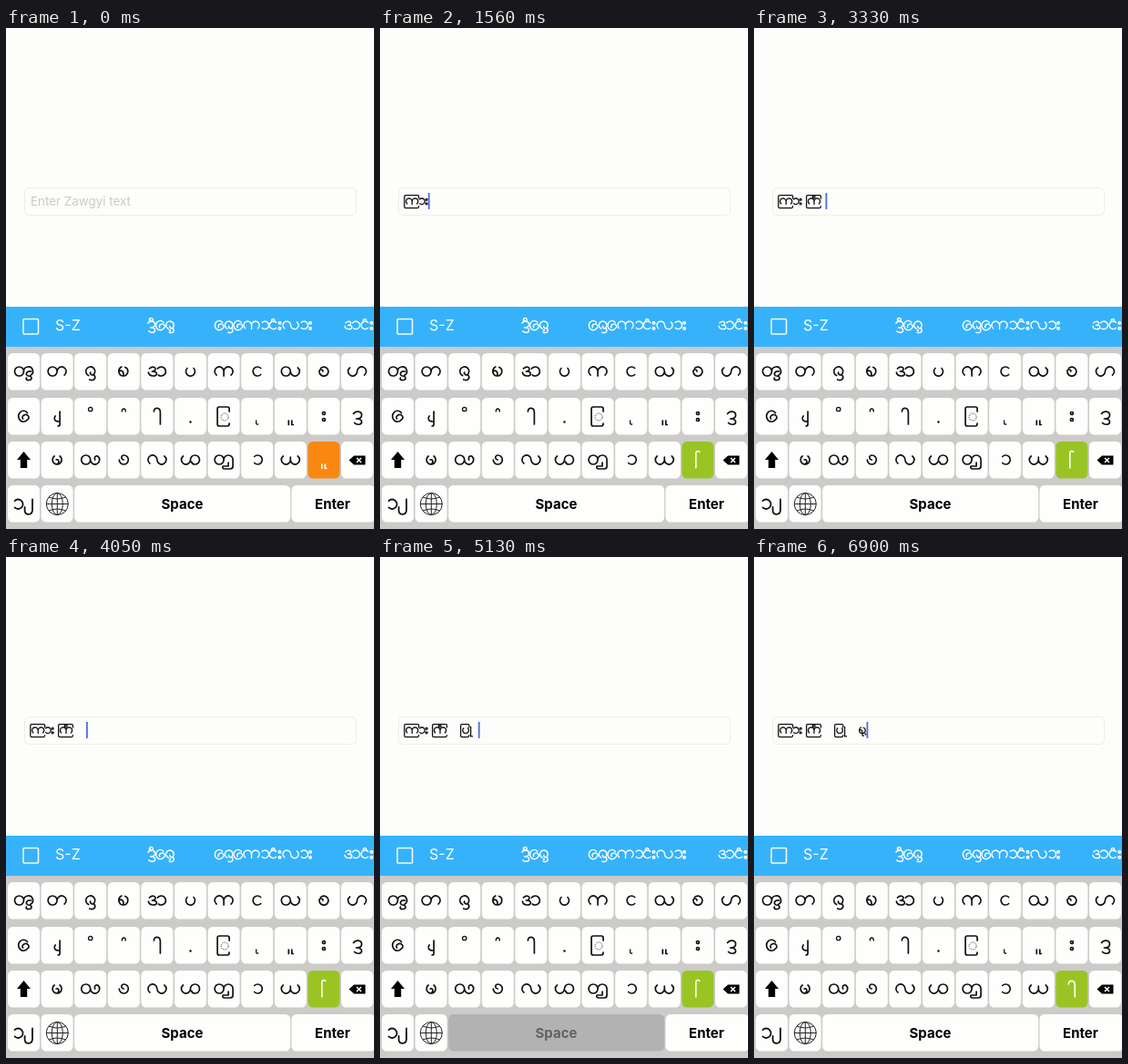
An HTML page that plays this animation: 404x550 px, repeating every 6930 ms.

```html
<!DOCTYPE html>
<html lang="en">
<head>
<meta charset="utf-8">
<title>Keyboard demo</title>
<style>
html, body { margin: 0; width: 100%; height: 100%; overflow: hidden; background: #fdfdfc; }
svg { display: block; width: 100%; height: 100%; }
text { font-family: Inter, Roboto, sans-serif; }
.glyph { fill: none; stroke: #111; stroke-linecap: round; stroke-linejoin: round; }
.light .glyph { stroke: #fff; }
.label { font-weight: 700; font-size: 15px; text-anchor: middle; }
.key rect { fill: #fefefd; }
.key.down rect { fill: #b3b2b2; }
.key.down .glyph, .key.down text { opacity: .45; }
.key.hint rect { fill: #99c424; }
.key.hint.first rect { fill: #f8880f; }
.hint .glyph { stroke: #fff; }
</style>
</head>
<body>
<svg id="stage" viewBox="0 0 404 550" preserveAspectRatio="none">
  <rect width="404" height="550" fill="#fdfdfc"/>
  <rect x="20.5" y="175.5" width="364" height="30" rx="5" fill="#fdfdfc" stroke="#eeede4"/>
  <text id="prompt" x="27" y="195" font-size="13.4" fill="#cbcac2">Enter Zawgyi text</text>
  <g id="typed"></g>
  <rect id="caret" y="181" width="1.8" height="18" fill="#4a6fd8"/>
  <rect y="306" width="404" height="44" fill="#36b2fb"/>
  <rect y="350" width="404" height="200" fill="#cccbc9"/>
  <g id="bar" class="light">
    <rect x="19" y="319.500" width="16.500" height="16.500" rx="1" fill="none" stroke="#f4fbf4" stroke-width="1.500"/>
    <text x="54" y="332" font-size="16" fill="#fff">S-Z</text>
  </g>
  <g id="keys"></g>
</svg>
<script>
const LOOP = 6930;
const ring = (x, y, r) => `M${x + r} ${y}a${r} ${r} 0 1 0 ${-2 * r} 0a${r} ${r} 0 1 0 ${2 * r} 0`;
const O = ring(5, 5, 5);
const U = 'M2 1A5 5 0 1 0 10 5';       // left bowl, open above
const N = 'M2 9A5 5 0 1 1 10 5';       // left bowl, open below
const U2 = 'M10 5A5 5 0 1 0 18 1';     // right bowl, open above
const N2 = 'M10 5A5 5 0 1 1 18 9';     // right bowl, open below
const dot = y => ring(1, y, .6);
const frame = w => `M${w} 0V-3Q${w}-5 ${w - 2}-5H2Q0-5 0-3V14Q0 16 2 16H${w - 2}Q${w} 16 ${w} 13`;

// name: [width, path]; letters stand between y = 0 and y = 10
const G = {
  hsa: [20, O + 'M10 5A5 5 0 1 1 17 9.500M18 5C13 4 11 9 15 10C19 10 20 14 16 14.500C13 15 12 13 13 12'],
  ta: [20, O + N2],
  na: [10, 'M3 9.500A5 5 0 1 1 8.500 8.500C6 10 4 7 5 6M8.500 8.500C12 12 9 16 4 14'],
  ma: [11, 'M3 0C1 1 0 3 0 5A5 5 0 0 0 10 5A4.500 4.500 0 0 0 7 .5M0 5C3 3 6 5 5 10'],
  a: [19, 'M1 2C4-1 8 0 7.500 3C7 5 4 5 4 5C11 5 10 10 5 10C2 10 0 8 0 6M10 2A5 5 0 1 1 11 9'],
  pa: [10, 'M1.500 1.500A5 5 0 1 0 8.500 1.500'],
  ka: [20, N + 'V10' + N2],
  nga: [9, 'M8.500 1.500A5 5 0 1 0 8.500 8.500'],
  sa: [20, O + U2],
  ca: [10, 'M1.500 1.500A5 5 0 1 1 0 5A2 2 0 0 1 4 5'],
  ha: [20, U + 'A5 5 0 1 1 18 9'],
  e: [10, 'M9 1.500A5.500 6 0 1 0 9 9A3.500 3 0 1 0 4 8'],
  ya: [6, 'M1 5C-1 8 0 11 5 11M6 0V14Q6 16 4 16'],
  i: [5, ring(2.5, -2.5, 2.2)],
  asat: [4, 'M0 0C0-4 4-4 4 0'],
  tall: [7, 'M0 0C0-5 7-5 7 1V14'],
  dot: [2, dot(11.5)],
  ra: [14, frame(13)],
  raDots: [14, frame(13)],
  u: [2, 'M0 10V13Q0 14.500 2 14'],
  uu: [4, 'M0 10V14.500M3.500 10V14.500H5'],
  vis: [4, ring(2, 2, 1.5) + ring(2, 9, 1.5)],
  da: [10, 'M1 2.500C3-1 10-1 10 4C10 7 7 8 4 8C8 8 10 9 10 11.500C10 15 4 15 2 12.500'],
  pha: [10, 'M2 1A5 5 0 1 0 8 1M5 10C8 8 7 4 4 5'],
  hta: [20, O + U2 + 'C15 0 14 3 15 5'],
  kha: [10, 'M0 5A5 5 0 1 0 5 0A2.500 2.500 0 0 0 5 5'],
  la: [20, N + 'A5 5 0 1 0 18 1'],
  ba: [20, U + 'A5 5 0 1 1 15 10A4 4 0 0 1 11 7'],
  nya: [20, O + 'M10 5A5 5 0 1 1 20 5V12Q20 15 17 15H11Q8 15 9 12H15V8'],
  aa: [9, 'M1.500 1.500A5 5 0 1 1 1.500 8.500'],
  ya2: [20, U + 'V2' + U2],
  two: [9, 'M9 0V11C9 17 1 17 1 12V8'],
  long: [4, 'M0 14V-2C0-5 3-5 4-3.500'],
  yw: [8, 'M0 9V14H3V9M8 6V14H5'],
  yh: [8, 'M0 9V13H3M8 4V15H4V11'],
  nn: [10, 'M1.500 6A4.500 4.500 0 1 1 8 7C5 8 1 10 4 11.500S8 8 10 9'],
  wy: [7, ring(2, 12, 2) + 'M7 5V15H4'],
  wh: [8, ring(5, 12, 2.2) + 'M0 9V13H3'],
  dotMid: [2, dot(10)],
  none: [0, ''],
  uuh: [5, 'M0 8V14M4 8V14H6'],
  ou: [11, 'M1.500 1.500A5 5 0 1 1 7 10C1 10 2 15 7 14L10 12'],
  nna: [22, N + 'V10' + N2 + 'M18 9C22 9 22 4 20 3'],
  ee: [10, 'M8 3A4 4 0 1 0 5 9C9 9 10 4 6 5M5 9C1 12 6 15 9 12'],
  ba2: [10, 'M2 1A5 5 0 1 0 8 1C5-1 4 4 8 4'],
  sub: [2, 'M2 10V14Q2 15 0 15'],
  ii: [5, ring(2.5, -2, 2.2) + dot(-2)],
  kinzi: [3, 'M2 0V-4Q0-5 0-3M3-6V-5'],
  w: [5, ring(2.5, 11.5, 2.2)],
  dotTop: [2, dot(-2)],
  slash: [5, 'M0-3L5 0'],
  uTall: [3, 'M0-1V15H3'],
  uuTall: [5, 'M0-1V15M4-1V15H5'],
  tallAsat: [9, 'M0 0C0-5 7-5 7 1V11M5-6Q9-7 9-4'],
  dha: [10, 'M1 8A5 5 0 1 1 5 10C1 10 1 6 5 6'],
  za: [10, 'M1 3A5 4 0 1 1 7 6C2 7 3 3 6 4M7 6C10 10 2 12 1 8'],
  tta: [10, 'M1 3A5 4 0 1 1 9 6H4C0 8 5 9 9 9V13Q8 15 4 14'],
  gha: [18, 'M2 1A5 5 0 1 0 9 7V2M9 7A4.500 4.500 0 1 0 15 1Q12 2 13 5'],
  lla: [10, 'M1 4A5 4 0 1 1 6 6C2 6 1 10 6 10C11 10 10 15 5 14'],
  bar: [1, 'M.5 2V9'],
  bars: [4, 'M.5 2V9M3.500 2V9'],
  wa: [10, O]
};
const MARKS = ['i', 'ii', 'dot', 'asat', 'u'];
const NS = 'http://www.w3.org/2000/svg';
const $ = id => document.getElementById(id);

function add(parent, tag, attrs, content) {
  const el = document.createElementNS(NS, tag);
  for (const k in attrs) el.setAttribute(k, attrs[k]);
  if (content) el.textContent = content;
  return parent.appendChild(el);
}

function glyph(parent, name, x, y, s = 1, line = 1.7) {
  const g = add(parent, 'g', { class: 'glyph', transform: `translate(${x} ${y}) scale(${s})`, 'stroke-width': line / s });
  add(g, 'path', { d: G[name][1] });
  if (name === 'raDots') add(g, 'path', { d: ring(8, 6, 4), 'stroke-width': 1, 'stroke-dasharray': '.1 2' });
  return g;
}

function run(parent, names, x, y, s, line) {
  let last = 0;
  for (const name of names.split(' ')) {
    const w = G[name][0] * s;
    if (MARKS.includes(name)) {
      glyph(parent, name, x - 2 * s - last / 2 - w / 2, y, s, line);
    } else {
      glyph(parent, name, x, y, s, line);
      x += w + 2 * s;
      last = w;
    }
  }
}

run($('bar'), 'da ii e na dot', 155, 322, .86, 1.4);
run($('bar'), 'e na e ka aa nga asat vis la aa vis', 230, 322, .86, 1.4);
run($('bar'), 'a nga asat vis', 372, 322, .86, 1.4);

// Keyboard
const PITCH = 36.6, ROWS = [357, 406, 454, 502];
const keys = {};

function key(parent, name, x, y, w = 35) {
  const g = add(parent, 'g', { class: 'key' });
  add(g, 'rect', { x, y, width: w, height: 40.5, rx: 5.5 });
  return keys[name] = g;
}

function layer(rows) {
  const g = add($('keys'), 'g', {});
  rows.forEach((row, r) => row.split(' ').forEach((name, i) => {
    const x = 2 + PITCH * (i + (r === 2 ? 1 : 0));
    const k = key(g, name, x, ROWS[r]);
    if (name === 'at') {
      add(k, 'text', { x: x + 17.5, y: ROWS[r] + 25, 'font-size': 17, 'text-anchor': 'middle' }, '@');
    } else {
      glyph(k, name, x + 17.5 - G[name][0] / 2, ROWS[r] + 15, 1, MARKS.includes(name) ? 1.3 : 1.7);
    }
  }));
  return g;
}

const plain = layer([
  'hsa ta na ma a pa ka nga sa ca ha',
  'e ya i asat tall dot raDots u uu vis da',
  'pha hta kha la ba nya aa ya2'
]);
const shifted = layer([
  'yw yh nn wy wh dotMid none uuh ou nna ee',
  'ba2 sub ii kinzi w dotTop slash uTall uuTall tallAsat dha',
  'za tta gha lla at bar bars wa'
]);

const fixed = add($('keys'), 'g', {});
const shift = key(fixed, 'shift', 2, ROWS[2]);
add(shift, 'path', { d: 'M19.500 465L27 474H23.200V483H15.800V474H12Z' });

const hint = key(fixed, 'hint', 2 + PITCH * 9, ROWS[2]);
const hints = {};
for (const name of ['uu', 'long', 'aa', 'dot', 'tall']) {
  const s = name === 'aa' ? .85 : 1;
  hints[name] = glyph(hint, name, 348.8 - G[name][0] * s / 2, ROWS[2] + 15, s, name === 'dot' ? 2 : 1.6);
}

const back = key(fixed, 'back', 2 + PITCH * 10, ROWS[2]);
add(back, 'path', { d: 'M376.500 474.500L382 469.500H394.500V479.500H382Z' });
add(back, 'path', { d: 'M385 472l5 5m0-5l-5 5', stroke: '#fff', 'stroke-width': 1.5 });

run(key(fixed, 'digits', 2, ROWS[3]), 'aa two', 8, 517.5, 1.05, 1.8);

const globe = add(key(fixed, 'globe', 2 + PITCH, ROWS[3]), 'g', { fill: 'none', stroke: '#222' });
add(globe, 'circle', { cx: 56.3, cy: 522.5, r: 12 });
add(globe, 'ellipse', { cx: 56.3, cy: 522.5, rx: 6, ry: 12 });
add(globe, 'path', { d: 'M44.300 522.500h24M56.300 510.500v24M47 515q9.300 4 18.600 0M47 530q9.300-4 18.600 0' });

add(key(fixed, 'space', 75.2, ROWS[3], 237), 'text', { x: 193.5, y: 528, class: 'label' }, 'Space');
add(key(fixed, 'enter', 313.5, ROWS[3], 92), 'text', { x: 358.5, y: 528, class: 'label' }, 'Enter');

// Presses: time, key, caret x, hint, then the typed glyph with its x
const presses = [
  [600, 'raDots', 42, 'long', 'ra', 26.8],
  [900, 'ka', 43.5, 'aa', 'ka', 28.6],
  [1140, 'aa', 49, 'long', 'aa', 42.6],
  [1380, 'vis', 52.8, 'long', 'vis', 49.8],
  [1740, 'space', 57, 'long'],
  [2040, 'raDots', 71, 'long', 'ra', 57.6],
  [2280, 'ka', 73.5, 'aa', 'ka', 59.4],
  [2520, 'shift', 73.5, 'aa'],
  [2820, 'ii', 74, 'long', 'ii', 64],
  [3180, 'space', 78.5, 'long'],
  [3480, 'space', 83.5, 'long'],
  [3780, 'space', 88, 'long'],
  [4170, 'raDots', 100, 'long', 'ra', 88.6],
  [4380, 'pa', 101, 'long', 'pa', 90.8],
  [4620, 'u', 101.5, 'long', 'uTall', 99.6],
  [4830, 'space', 104.5, 'long'],
  [5070, 'space', 107.8, 'long'],
  [5340, 'space', 111.5, 'long'],
  [5580, 'space', 115, 'long'],
  [5820, 'ma', 123.5, 'dot', 'ma', 115.6],
  [6300, 'u', 123.5, 'dot', 'u', 119],
  [6630, 'dot', 123.5, 'tall', 'dot', 121.8]
];
const typed = presses.map(([, , , , name, x], i) => {
  if (!name) return null;
  const g = glyph($('typed'), name, x, 187, .66, 1.3);
  // The frame is as wide as the letter that follows it
  if (name === 'ra') g.firstChild.setAttribute('d', frame(G[presses[i + 1][4]][0] + 4));
  return g;
});

const HOLD = 105;
const show = (el, on) => { el.style.display = on ? '' : 'none'; };

function render(t) {
  const now = presses.filter(p => p[0] <= t).pop();
  const upper = t >= 2520 && t < 2820;
  show($('prompt'), !now);
  show($('caret'), now);
  if (now) $('caret').setAttribute('x', now[2]);
  typed.forEach((g, i) => g && show(g, presses[i][0] <= t));
  show(plain, !upper);
  show(shifted, upper);
  const active = now && t - now[0] < HOLD ? now[1] : '';
  for (const name in keys) keys[name].classList.toggle('down', name === active && name !== 'shift');
  shift.classList.toggle('down', upper);
  hint.setAttribute('class', now ? 'key hint' : 'key hint first');
  for (const name in hints) show(hints[name], name === (now ? now[3] : 'uu'));
}

const start = performance.now();
function tick() {
  render((performance.now() - start) % LOOP);
  requestAnimationFrame(tick);
}
tick();
</script>
</body>
</html>
```
